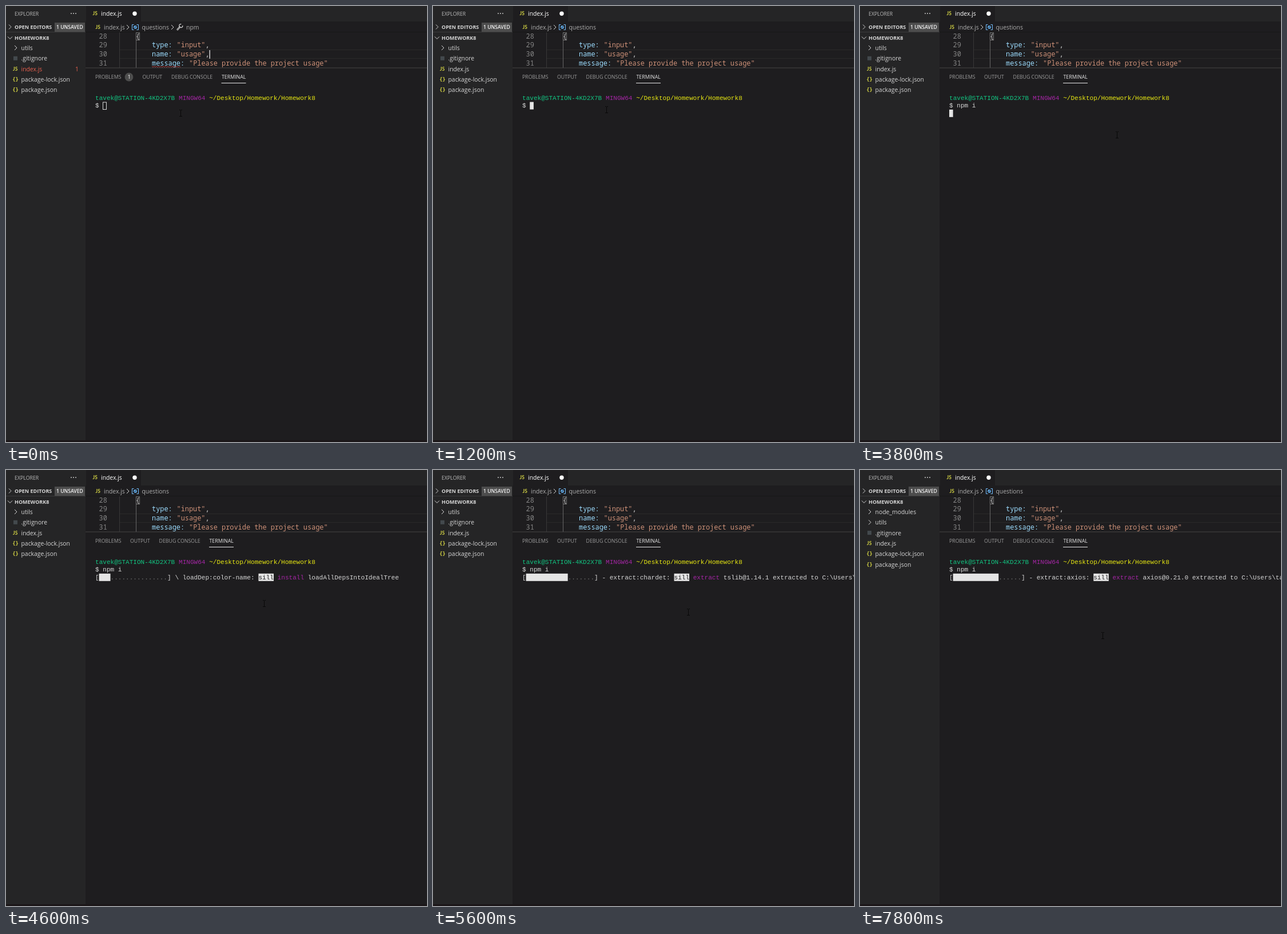
Recreate the animation shown at these times as an HTML page with a canvas. Size 736 px wide and 761 px high, loop 8000 ms.

```html
<!DOCTYPE html>
<html lang="en">
<head>
<meta charset="utf-8">
<title>Terminal install</title>
<style>
  html, body { margin: 0; width: 100%; height: 100%; overflow: hidden; background: #1e1d1f; }
  canvas { display: block; }
</style>
</head>
<body>
<canvas id="stage" width="736" height="761"></canvas>
<script>
const ctx = document.getElementById('stage').getContext('2d');
const LOOP = 8000, STEP = 200;
const UI = '10.4px "Open Sans", sans-serif';
const CAPS = '8.8px "Open Sans", sans-serif';
const BOLD = 'bold 9px "Open Sans", sans-serif';
const ICON = 'bold 8.5px Lato, sans-serif';
const BRACES = 'bold 9px "DejaVu Sans Mono", monospace';
const CODE = '11.9px "Noto Sans Mono", monospace';
const TERM = '11.06px "Liberation Mono", monospace';
const CELL = 6.638, ROW = 13.3, TERM_X = 156, TERM_Y = 164;
const BACK = '#1e1d1f', SIDE = '#252526';
const GREY = '#d6d6d6', DIM = '#9c9c9c', CRUMB = '#adadad';
const YELLOW = '#d3d344', PURPLE = '#a626a6', RED = '#e8604f';

// Pointer stops: time, x, y
const POINTER = [
  [0, 305, 187], [200, 305, 187], [800, 303, 181], [2700, 303, 181], [3700, 449, 224],
  [4600, 451, 233], [5600, 446, 248], [6000, 437, 271], [6800, 424, 289], [LOOP, 424, 289]
];

function rect(x, y, w, h, color) {
  ctx.fillStyle = color;
  ctx.fillRect(x, y, w, h);
}

function text(str, x, y, font, color) {
  ctx.font = font;
  ctx.fillStyle = color;
  ctx.fillText(str, x, y);
}

function line(points, color, width = 1) {
  ctx.strokeStyle = color;
  ctx.lineWidth = width;
  ctx.beginPath();
  points.forEach(([x, y]) => ctx.lineTo(x, y));
  ctx.stroke();
}

function frame(x, y, w, h, color) {
  ctx.strokeStyle = color;
  ctx.lineWidth = 1;
  ctx.strokeRect(x, y, w, h);
}

function circle(x, y, r, color) {
  ctx.fillStyle = color;
  ctx.beginPath();
  ctx.arc(x, y, r, 0, Math.PI * 2);
  ctx.fill();
}

function chevron(x, y, down) {
  line(down ? [[x - 4, y - 2], [x, y + 2], [x + 4, y - 2]]
            : [[x - 2, y - 4], [x + 2, y], [x - 2, y + 4]], GREY);
}

function drawSidebar(hasError, hasModules) {
  rect(0, 0, 139, 761, SIDE);
  text('EXPLORER', 15, 16.5, CAPS, '#bbbbbb');
  for (let i = 0; i < 3; i++) circle(114 + i * 4, 13, 0.9, GREY);

  chevron(7, 36.5, false);
  text('OPEN EDITORS', 15, 40, BOLD, GREY);
  rect(85, 29, 53, 16, '#4d4d4d');
  text('1 UNSAVED', 88, 40.3, '600 8.6px "Open Sans", sans-serif', '#f4f4f4');
  rect(0, 45, 139, 1, '#3b3b3c');
  chevron(7, 55.5, true);
  text('HOMEWORK8', 15, 59, BOLD, GREY);

  const files = ['utils', '.gitignore', 'index.js', 'package-lock.json', 'package.json'];
  if (hasModules) files.unshift('node_modules');
  files.forEach((name, i) => {
    const y = 73 + i * 18.3;
    const failing = hasError && name === 'index.js';
    if (name === '.gitignore') rect(13, y - 3.5, 7, 7, '#43494d');
    else if (name.endsWith('.js')) text('JS', 12, y + 3.2, ICON, YELLOW);
    else if (name.endsWith('.json')) text('{}', 11.2, y + 3, BRACES, YELLOW);
    else chevron(17, y, false);
    text(name, 26.5, y + 4, UI, failing ? RED : GREY);
    if (failing) text('1', 121, y + 4, UI, RED);
  });
}

function drawWrench() {
  line([[299, 42], [304.5, 36]], GREY, 2.6);
  line([[299, 42], [304.5, 36]], BACK, 0.8);
  ctx.strokeStyle = GREY;
  ctx.lineWidth = 1.2;
  ctx.beginPath();
  ctx.arc(305.8, 34.6, 3, -0.2, 4.9);
  ctx.stroke();
}

function drawEditor(hasError, focused) {
  rect(139, 0, 597, 27, SIDE);
  rect(140, 0, 96, 27, BACK);
  text('JS', 151.5, 16.2, ICON, YELLOW);
  text('index.js', 166, 17, UI, '#ffffff');
  circle(225, 13.2, 3.7, '#ffffff');

  text('JS', 156.5, 40, ICON, YELLOW);
  text('index.js', 171, 40.8, UI, CRUMB);
  chevron(213, 37, false);
  line([[223.5, 32.5], [220.5, 32.5], [220.5, 41.5], [223.5, 41.5]], '#75beff');
  line([[228.5, 32.5], [231.5, 32.5], [231.5, 41.5], [228.5, 41.5]], '#75beff');
  circle(226, 37, 3, '#5a9fd8');
  line([[224, 38.5], [228, 35.5]], BACK, 0.8);
  text('questions', 237.5, 40.8, UI, CRUMB);
  if (hasError) {
    chevron(291, 37, false);
    drawWrench();
    text('npm', 315, 40.8, UI, CRUMB);
  }
  rect(139, 45, 597, 1, '#171717');

  rect(199, 76, 537, 1, '#2a2a2a');
  rect(199, 91, 537, 1, '#2a2a2a');
  rect(198, 46, 1, 62, '#383838');
  rect(227, 60, 1, 48, '#686868');
  frame(227.5, 46.5, 6, 13, '#777777');

  const rows = [
    [['{', '#d4d4d4', 227]],
    [['type:', '#9cdcfe', 255], ['"input"', '#ce9178', 298.5], [',', '#d4d4d4', 348.5]],
    [['name:', '#9cdcfe', 255], ['"usage"', '#ce9178', 298.5], [',', '#d4d4d4', 348.5]],
    [['message:', '#9cdcfe', 255], ['"Please provide the project usage"', '#ce9178', 320]]
  ];
  rows.forEach((tokens, i) => {
    const y = 56.6 + i * 15.7;
    text(28 + i, 162.5, y, CODE, '#858585');
    tokens.forEach(([str, color, x]) => text(str, x, y, CODE, color));
  });
  if (hasError) {
    const wave = Array.from({ length: 26 }, (_, i) => [255 + i * 2, 105 + (i % 2) * 2]);
    line(wave, '#d04545', 0.8);
  }
  if (!focused) rect(355.5, 77, 1.4, 15, '#dddddd');
}

function drawPanelTabs(hasError) {
  rect(139, 107.5, 597, 1, '#454545');
  const shift = hasError ? 21.5 : 0;
  text('PROBLEMS', 156, 127, CAPS, DIM);
  if (hasError) {
    circle(215, 124, 7.4, '#4d4d4d');
    text('1', 212.7, 127, CAPS, '#ffffff');
  }
  text('OUTPUT', 217 + shift, 127, CAPS, DIM);
  text('DEBUG CONSOLE', 267.5 + shift, 127, CAPS, DIM);
  text('TERMINAL', 355.5 + shift, 127, CAPS, '#e7e7e7');
  rect(355 + shift, 134, 43, 1, '#e7e7e7');
}

// Writes terminal text at a column and row; `inverse` fills the cells behind it.
function term(str, col, row, color, inverse) {
  const x = TERM_X + col * CELL;
  if (inverse) rect(x, 167.5 + (row - 1) * ROW, str.length * CELL, ROW - 0.3, '#e5e5e5');
  text(str, x, TERM_Y + row * ROW, TERM, inverse ? BACK : color);
}

function progress(filled, spinner, task, verb, detail) {
  const col = 25 + task.length;
  term('[', 0, 2, GREY);
  term(' '.repeat(filled), 1, 2, GREY, true);
  term('.'.repeat(18 - filled), 1 + filled, 2, '#707070');
  term(`] ${spinner} ${task}:`, 19, 2, GREY);
  term('sill', col, 2, GREY, true);
  term(verb, col + 5, 2, PURPLE);
  term(detail, col + 6 + verb.length, 2, GREY);
}

function drawTerminal(time, focused) {
  term('tavek@STATION-4KD2X7B', 0, 0, '#12c481');
  term('MINGW64', 22, 0, PURPLE);
  term('~/Desktop/Homework/Homework8', 30, 0, '#e8e812');
  const typed = 'npm i'.slice(0, time < 1600 ? 0 : time < 1800 ? 1 : time < 2000 ? 3 : 5);
  term('$ ' + typed, 0, 1, GREY);

  if (!focused) {
    frame(169.5, 168, 6, 12.5, GREY);
  } else if (time < 3000) {
    term(' ', 2 + typed.length, 1, GREY, true);
  } else if (time < 4200) {
    term(' ', 0, 2, GREY, true);
  } else if (time < 5200) {
    progress(3, '\\', 'loadDep:color-name', 'install', 'loadAllDepsIntoIdealTree');
  } else if (time < 5800) {
    progress(11, '-', 'extract:chardet', 'extract', 'tslib@1.14.1 extracted to C:\\Users\\tavek');
  } else {
    progress(12, '-', 'extract:axios', 'extract', 'axios@0.21.0 extracted to C:\\Users\\tavek');
  }
}

function drawPointer(time) {
  const next = POINTER.findIndex(stop => stop[0] > time);
  const [t0, x0, y0] = POINTER[next - 1], [t1, x1, y1] = POINTER[next];
  const k = (time - t0) / (t1 - t0);
  const x = Math.round(x0 + (x1 - x0) * k), y = Math.round(y0 + (y1 - y0) * k);
  rect(x, y - 5, 1, 11, '#080808');
  for (const end of [y - 6, y + 5]) {
    rect(x - 2, end, 2, 1, '#080808');
    rect(x + 1, end, 2, 1, '#080808');
  }
}

function draw(now) {
  const time = Math.floor((now % LOOP) / STEP) * STEP;
  const hasError = time < 400, focused = time >= 800;
  rect(0, 0, 736, 761, BACK);
  drawSidebar(hasError, time >= 5800);
  drawEditor(hasError, focused);
  drawPanelTabs(hasError);
  drawTerminal(time, focused);
  rect(0, 758, 736, 3, '#1b1618');
  drawPointer(time);
  requestAnimationFrame(draw);
}
requestAnimationFrame(draw);
</script>
</body>
</html>
```
